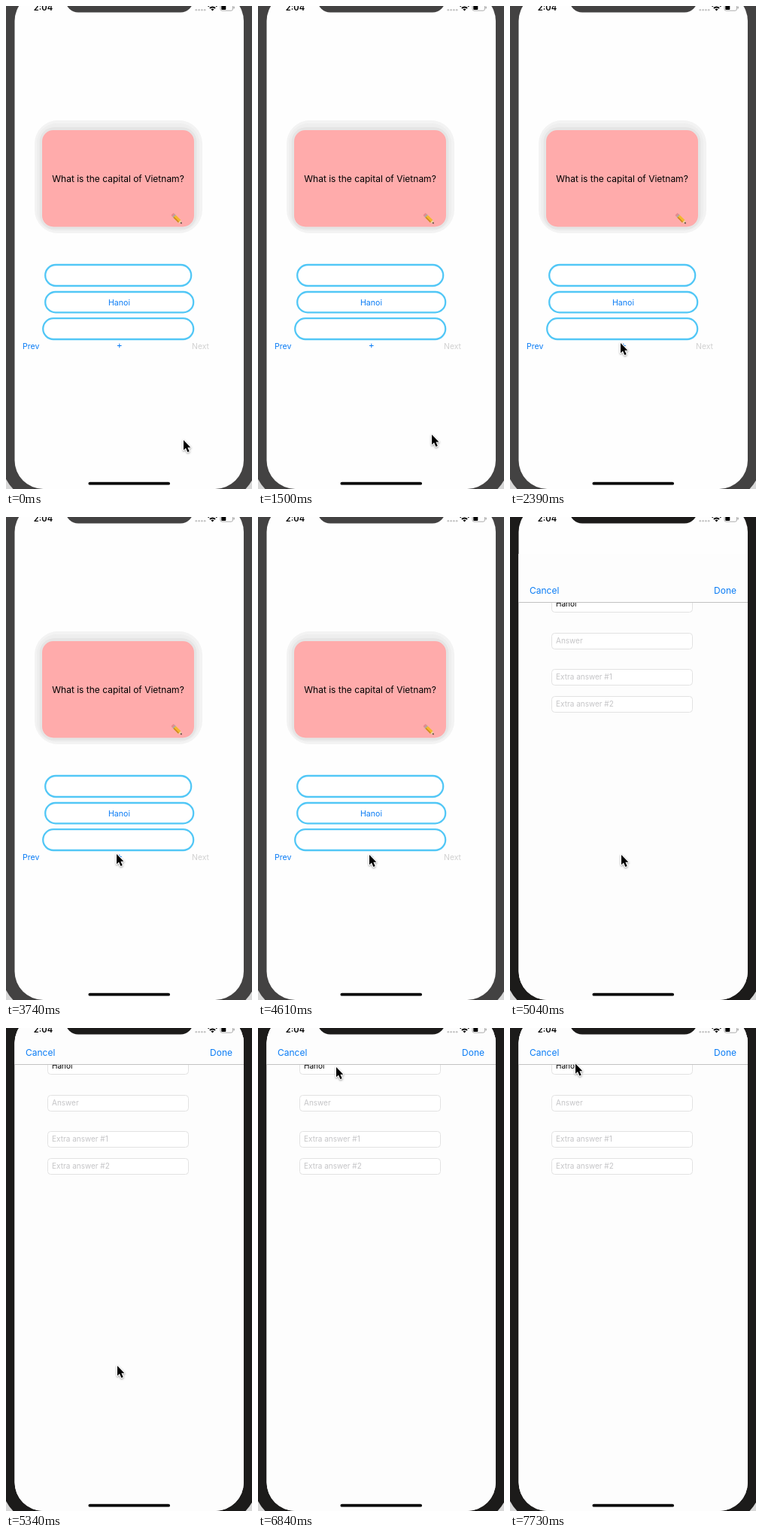
An HTML page with a canvas that plays this animation: 327 px wide and 642 px high, repeating every 8000 ms.

```html
<!DOCTYPE html>
<html lang="en">
<head>
<meta charset="utf-8">
<title>Flashcards</title>
<style>
  html, body { margin: 0; width: 100%; height: 100%; overflow: hidden; background: #fff; }
  canvas { display: block; width: 327px; height: 642px; }
</style>
</head>
<body>
<canvas id="stage"></canvas>
<script>
const W = 327, H = 642, LOOP = 8000;
const BLUE = '#0a7cf5', RING = '#52c7f6';
const canvas = document.getElementById('stage');
const ctx = canvas.getContext('2d');
const dpr = window.devicePixelRatio || 1;
canvas.width = W * dpr;
canvas.height = H * dpr;

const WINDOW_FOCUS = 4740;
const SHEET = { start: 4890, step: 150, frames: 4, travel: 660 };

// Each pointer move runs in discrete steps between two times.
const POINTER_HOME = [236, 577];
const MOVES = [
  { from: 1500, until: 2390, steps: 7, to: [147, 448] },
  { from: 3740, until: 4610, steps: 7, to: [148, 449] },
  { from: 5640, until: 6240, steps: 5, to: [112, 51] },
  { from: 6690, until: 6840, steps: 2, to: [104, 52] },
  { from: 7580, until: 7730, steps: 2, to: [87, 47.5] }
];

const smooth = p => p * p * (3 - 2 * p);

function pointerAt(t) {
  let pos = POINTER_HOME;
  for (const m of MOVES) {
    if (t < m.from) break;
    const gap = (m.until - m.from) / (m.steps - 1);
    const step = Math.min(m.steps, Math.floor((t - m.from) / gap + 1e-6) + 1);
    const p = smooth(step / m.steps);
    pos = pos.map((v, i) => v + (m.to[i] - v) * p);
  }
  return pos;
}

// Critically damped spring, sampled once per step.
function sheetOffset(t) {
  if (t < SHEET.start) return null;
  const i = Math.floor((t - SHEET.start) / SHEET.step);
  if (i >= SHEET.frames - 1) return 0;
  const x = 1.205 + 2.7 * i;
  return Math.round(SHEET.travel * (1 + x) * Math.exp(-x));
}

function box(x, y, w, h, r, fill, stroke, line = 1) {
  ctx.beginPath();
  ctx.roundRect(x, y, w, h, r);
  if (fill) { ctx.fillStyle = fill; ctx.fill(); }
  if (stroke) { ctx.strokeStyle = stroke; ctx.lineWidth = line; ctx.stroke(); }
}

function label(text, x, y, size, color, align = 'left', weight = 400) {
  ctx.font = `${weight} ${size}px Inter, sans-serif`;
  ctx.textAlign = align;
  ctx.fillStyle = color;
  ctx.fillText(text, x, y);
}

function stroke(x1, y1, x2, y2, color, width) {
  ctx.beginPath();
  ctx.moveTo(x1, y1);
  ctx.lineTo(x2, y2);
  ctx.strokeStyle = color;
  ctx.lineWidth = width;
  ctx.stroke();
}

function polygon(points, fill) {
  ctx.beginPath();
  points.forEach(([x, y]) => ctx.lineTo(x, y));
  ctx.closePath();
  ctx.fillStyle = fill;
  ctx.fill();
}

function drawPencil() {
  ctx.save();
  ctx.translate(221, 276.5);
  ctx.rotate(Math.PI / 4);
  box(0, -2.4, 3, 4.8, 1.2, '#e58a8f');
  box(2.6, -2.4, 2, 4.8, 0, '#a9aaa5');
  box(4.4, -2.4, 9.4, 4.8, 0, '#f3b72f');
  box(4.4, 0.9, 9.4, 1.5, 0, '#c98522');
  polygon([[13.8, -2.4], [18, 0], [13.8, 2.4]], '#ecd0a0');
  polygon([[16, -1.2], [18.4, 0], [16, 1.2]], '#3b3431');
  ctx.restore();
}

function drawCard() {
  box(38, 152, 223, 150, 31, '#f3f3f3');
  box(41, 156, 216, 143, 26, '#eeeeee');
  box(44.5, 161, 209, 136, 20, '#e5e5e5');
  box(48, 165, 202, 128.5, 15, '#ffabab');
  label('What is the capital of Vietnam?', 149, 234, 12, '#000', 'center');
  drawPencil();
}

function drawQuiz(t) {
  drawCard();
  const pill = (x, y, w, h) => box(x, y, w, h, h / 2, '#fff', RING, 2.3);
  pill(52.2, 344, 194, 28);
  pill(52.2, 380, 197, 27.3);
  pill(49.2, 415.2, 200, 27.8);
  label('Hanoi', 150.5, 397.5, 10.6, BLUE, 'center');
  label('Prev', 22, 456.3, 10.6, BLUE);
  label('Next', 270, 456.3, 10.4, '#d0d0d0', 'right');
  ctx.globalAlpha = t < 4610 ? 1 : 0.2;
  stroke(148, 451.5, 153.6, 451.5, BLUE, 1);
  stroke(150.8, 448.7, 150.8, 454.3, BLUE, 1);
  ctx.globalAlpha = 1;
}

function drawField(y, text, color) {
  box(55.5, y + 0.5, 187, 21, 4, '#fff', '#e2e2e2');
  label(text, 61, y + 14.3, 10, color);
}

function drawSheet(offset) {
  ctx.save();
  ctx.translate(0, offset);
  box(0, -16, W, 700, 0, '#fdfdfd');
  drawField(40, 'Hanoi', '#000');
  drawField(89, 'Answer', '#c5c5c7');
  drawField(137, 'Extra answer #1', '#c5c5c7');
  drawField(173, 'Extra answer #2', '#c5c5c7');
  box(0, -16, W, 64, 0, '#fdfdfd');
  stroke(0, 48.5, W, 48.5, '#c2c2c2', 1);
  label('Cancel', 26, 37, 12, BLUE);
  label('Done', 301, 37, 12, BLUE, 'right');
  ctx.restore();
}

function drawStatusBar() {
  label('2:04', 36.8, 6.4, 11.2, '#000', 'left', 600);
  for (let i = 0; i < 4; i++) box(251.5 + i * 3.8, 4, 2.6, 2.6, 1.3, '#c4c4c4');
  ctx.lineWidth = 2;
  ctx.strokeStyle = '#000';
  for (const r of [5, 8.5]) {
    ctx.beginPath();
    ctx.arc(274.5, 6.5, r, -Math.PI * 0.75, -Math.PI * 0.25);
    ctx.stroke();
  }
  polygon([[272.4, 4.3], [274.5, 6.6], [276.6, 4.3], [274.5, 3.4]], '#000');
  box(285, -2, 16.5, 8.2, 2.2, null, '#a2a2a2', 0.9);
  box(286.3, -0.8, 6, 5.8, 1, '#000');
  box(302.5, 0.6, 1.3, 3, 0.6, '#a2a2a2');
}

function drawPointer([x, y]) {
  ctx.save();
  ctx.translate(x, y);
  ctx.beginPath();
  [[0, 0], [0, 13.2], [3, 10.5], [5.4, 16], [7.7, 15], [5.4, 9.7], [9.4, 9.7]]
    .forEach(([px, py]) => ctx.lineTo(px, py));
  ctx.closePath();
  ctx.lineJoin = 'round';
  ctx.shadowColor = 'rgba(0,0,0,.4)';
  ctx.shadowBlur = 2.5 * dpr;
  ctx.shadowOffsetY = dpr;
  ctx.strokeStyle = '#fff';
  ctx.lineWidth = 2;
  ctx.stroke();
  ctx.shadowColor = 'transparent';
  ctx.fillStyle = '#000';
  ctx.fill();
  ctx.restore();
}

function draw(t) {
  const bezel = t < WINDOW_FOCUS ? '#434242' : '#1c1b1a';
  ctx.setTransform(dpr, 0, 0, dpr, 0, 0);
  box(0, 0, W, H, 0, '#d8d8d8');
  box(-6.5, -40, 341, 700, 58, bezel);

  ctx.save();
  ctx.beginPath();
  ctx.roundRect(11.5, -18, 304.5, 660, 38);
  ctx.clip();
  box(0, 0, W, H, 0, '#fefefe');
  const offset = sheetOffset(t);
  if (offset !== 0) drawQuiz(t);
  if (offset !== null) drawSheet(offset);
  drawStatusBar();
  box(79, -30, 170, 38.5, 17, bezel);
  box(109.5, 632.8, 108.5, 3.7, 1.85, '#000');
  ctx.restore();

  drawPointer(pointerAt(t));
}

const start = performance.now();
function tick() {
  draw((performance.now() - start) % LOOP);
  requestAnimationFrame(tick);
}
tick();
</script>
</body>
</html>
```
